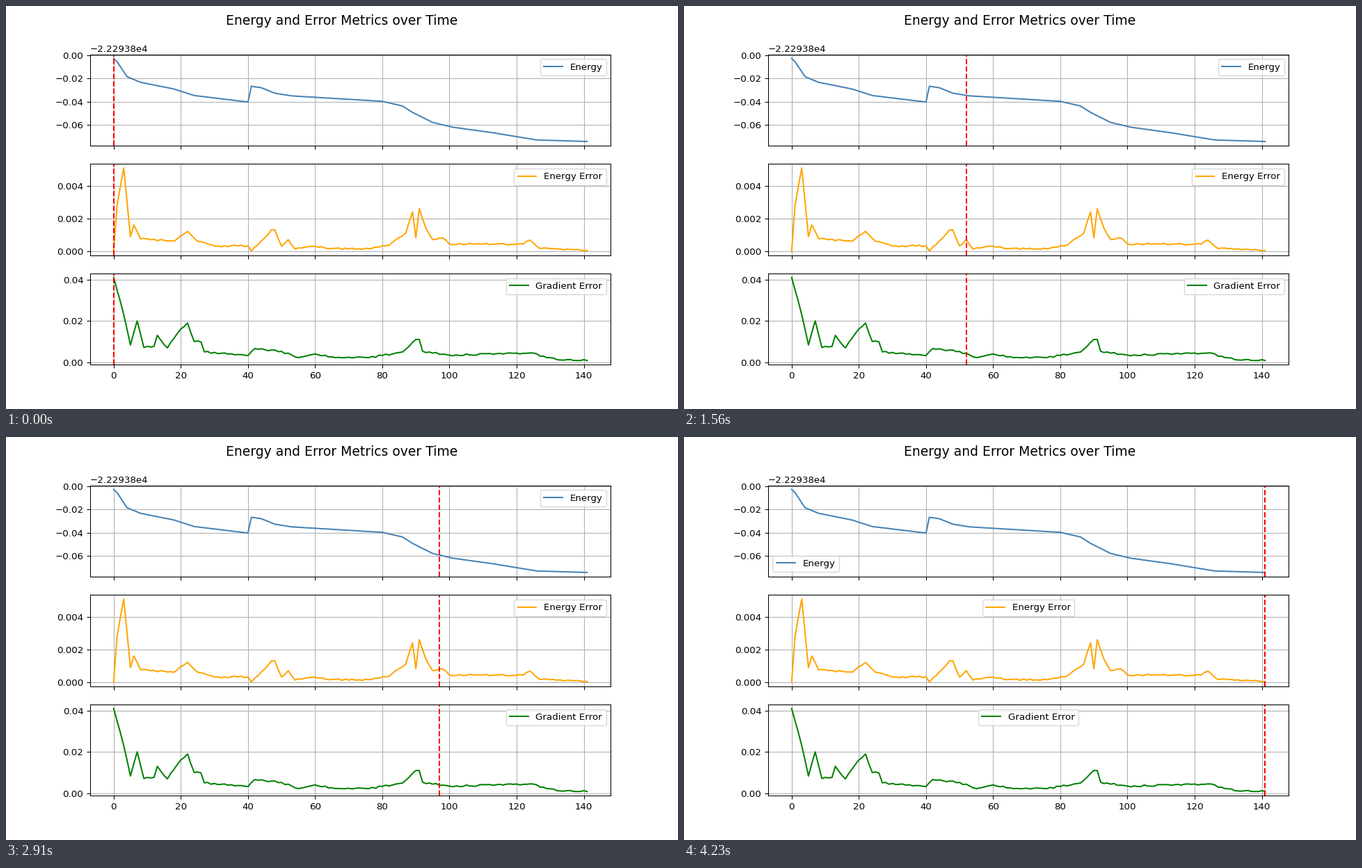
Write a matplotlib script that moves like this. It is 966 px wide and 580 px high and loops after 4.26 s.

```python
import matplotlib.pyplot as plt
import numpy as np
from matplotlib.animation import FuncAnimation

WIDTH, HEIGHT, DPI = 966, 580, 96.6
STEPS = 142
INTERVAL = 30
BASE = -22293.8

rng = np.random.default_rng(4)
steps = np.arange(STEPS)


def curve(bends, unit, jitter=0):
    """Straight runs between bends, with a little noise along each run."""
    at, level = list(bends), list(bends.values())
    noise = rng.uniform(-jitter, jitter, STEPS)
    noise[at] = 0
    values = np.interp(steps, at, level) + noise
    return np.clip(values, min(level), max(level)) * unit


energy = BASE - curve({
    0: 28, 1: 55, 4: 185, 8: 233, 18: 291, 24: 347, 40: 403, 41: 267,
    44: 280, 48: 327, 53: 350, 80: 397, 86: 437, 89: 492, 95: 579,
    101: 620, 113: 668, 126: 730, 141: 743,
}, 1e-4)

energy_error = curve({
    0: 0, 1: 280, 3: 510, 5: 88, 6: 160, 8: 75, 18: 60, 22: 121, 25: 60,
    30: 30, 40: 32, 41: 0, 44: 62, 47: 130, 48: 130, 50: 30, 52: 70,
    54: 12, 60: 30, 64: 14, 76: 14, 82: 35, 87: 110, 89: 240, 90: 82,
    91: 260, 93: 140, 95: 70, 98: 80, 100: 43, 122: 43, 124: 67,
    127: 15, 141: 3,
}, 1e-5, jitter=5)

gradient_error = curve({
    0: 410, 1: 350, 3: 230, 5: 83, 7: 200, 9: 71, 12: 76, 13: 130,
    16: 69, 19: 140, 22: 190, 24: 100, 26: 98, 27: 50, 40: 32, 42: 66,
    50: 52, 55: 22, 60: 40, 66: 22, 76: 22, 86: 49, 90: 110, 91: 110,
    92: 53, 100: 34, 124: 45, 132: 12, 141: 8,
}, 1e-4, jitter=4)

series = [
    ("Energy", energy, "steelblue"),
    ("Energy Error", energy_error, "orange"),
    ("Gradient Error", gradient_error, "green"),
]

fig, axes = plt.subplots(3, 1, sharex=True, dpi=DPI,
                         figsize=(WIDTH / DPI, HEIGHT / DPI))
fig.suptitle("Energy and Error Metrics over Time", fontsize=14)

cursors = []
for ax, (label, values, color) in zip(axes, series):
    ax.plot(steps, values, color=color, label=label)
    cursors.append(ax.axvline(0, color="red", linestyle="--"))
    ax.grid(True)
    # "best" makes the legend jump aside when the cursor reaches it
    ax.legend(loc="best")
axes[0].ticklabel_format(axis="y", useOffset=BASE)


def update(step):
    for cursor in cursors:
        cursor.set_xdata([step, step])
    return cursors


anim = FuncAnimation(fig, update, frames=STEPS, interval=INTERVAL,
                     repeat=True, repeat_delay=0, blit=False)
plt.show()
```
